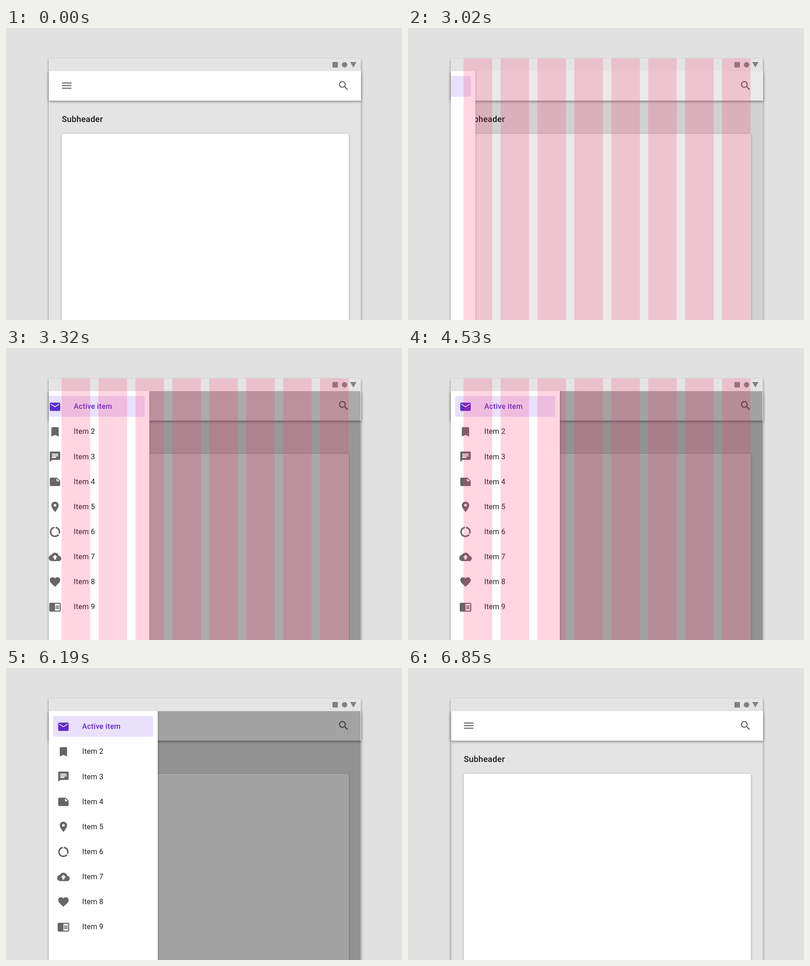
Recreate the animation shown at these times as an HTML page with a canvas. Size 871x643 px, loop 6.88 s.

```html
<!DOCTYPE html>
<html lang="en">
<head>
<meta charset="utf-8">
<title>Navigation drawer on a column grid</title>
<style>
html, body { margin: 0; width: 100%; height: 100%; overflow: hidden; background: #e1e1e1; }
canvas { display: block; width: 871px; height: 643px; font-family: Roboto, sans-serif; }
</style>
</head>
<body>
<canvas id="stage" width="871" height="643"></canvas>
<script>
const W = 871, H = 643, LOOP = 6880;
const LEFT = 94, RIGHT = 780.5, TOP = 67, BAR = 95, BAR_END = 160;
const DRAWER = 240, ICON = 1.15;
const c = document.getElementById('stage').getContext('2d');

const paths = {
  menu: 'M3 18h18v-2H3v2zm0-5h18v-2H3v2zm0-7v2h18V6H3z',
  search: 'M15.5 14h-.79l-.28-.27C15.41 12.59 16 11.11 16 9.5 16 5.91 13.09 3 9.5 3S3 5.91 3 9.5 5.91 16 9.5 16c1.61 0 3.09-.59 4.23-1.57l.27.28v.79l5 4.99L20.49 19l-4.99-5zm-6 0C7.01 14 5 11.99 5 9.5S7.01 5 9.5 5 14 7.01 14 9.5 11.99 14 9.5 14z',
  mail: 'M20 4H4c-1.1 0-2 .9-2 2v12c0 1.1.9 2 2 2h16c1.1 0 2-.9 2-2V6c0-1.1-.9-2-2-2zm0 4l-8 5-8-5V6l8 5 8-5v2z',
  bookmark: 'M17 3H7c-1.1 0-2 .9-2 2v16l7-3 7 3V5c0-1.1-.9-2-2-2z',
  chat: 'M20 2H4c-1.1 0-2 .9-2 2v18l4-4h14c1.1 0 2-.9 2-2V4c0-1.1-.9-2-2-2zM6 9h12v2H6V9zm8 5H6v-2h8v2zm4-6H6V6h12v2z',
  note: 'M22 10l-6-6H4c-1.1 0-2 .9-2 2v12c0 1.1.9 2 2 2h16c1.1 0 2-.9 2-2v-8zm-7-4.5l5.5 5.5H15V5.5z',
  place: 'M12 2C8.13 2 5 5.13 5 9c0 5.25 7 13 7 13s7-7.75 7-13c0-3.87-3.13-7-7-7zm0 9.5a2.5 2.5 0 1 1 0-5 2.5 2.5 0 0 1 0 5z',
  usage: 'M13 2.05v3.03c3.39.49 6 3.39 6 6.92 0 .9-.18 1.75-.48 2.54l2.6 1.53c.56-1.24.88-2.62.88-4.07 0-5.18-3.95-9.45-9-9.95zM12 19c-3.87 0-7-3.13-7-7 0-3.53 2.61-6.43 6-6.92V2.05c-5.06.5-9 4.76-9 9.95 0 5.52 4.47 10 9.99 10 3.31 0 6.24-1.61 8.06-4.09l-2.6-1.53C16.17 17.98 14.21 19 12 19z',
  cloud: 'M19.35 10.04C18.67 6.59 15.64 4 12 4 9.11 4 6.6 5.64 5.35 8.04 2.34 8.36 0 10.91 0 14c0 3.31 2.69 6 6 6h13c2.76 0 5-2.24 5-5 0-2.64-2.05-4.78-4.65-4.96zM14 13v4h-4v-4H7l5-5 5 5h-3z',
  heart: 'M12 21.35l-1.45-1.32C5.4 15.36 2 12.28 2 8.5 2 5.42 4.42 3 7.5 3c1.74 0 3.41.81 4.5 2.09C13.09 3.81 14.76 3 16.5 3 19.58 3 22 5.42 22 8.5c0 3.78-3.4 6.86-8.55 11.54L12 21.35z',
  reader: 'M13 12h7v1.5h-7zm0-2.5h7V11h-7zm0 5h7V16h-7zM21 4H3c-1.1 0-2 .9-2 2v13c0 1.1.9 2 2 2h18c1.1 0 2-.9 2-2V6c0-1.1-.9-2-2-2zm0 15h-9V6h9v13z'
};
const shapes = {};
for (const name in paths) shapes[name] = new Path2D(paths[name]);
const rows = ['mail', 'bookmark', 'chat', 'note', 'place', 'usage', 'cloud', 'heart', 'reader'];

function bezier(x1, x2) {
  const at = (s, a, b) => 3 * (1 - s) * (1 - s) * s * a + 3 * (1 - s) * s * s * b + s * s * s;
  return x => {
    if (x <= 0) return 0;
    if (x >= 1) return 1;
    let lo = 0, hi = 1;
    for (let i = 0; i < 30; i++) {
      const mid = (lo + hi) / 2;
      if (at(mid, x1, x2) < x) lo = mid; else hi = mid;
    }
    return at(lo, 0, 1);
  };
}
const slide = bezier(0.48, 0.31);
const fade = bezier(0.33, 0.67);
const span = (t, start, length) => (t - start) / length;

function rect(x, y, w, h, color) {
  c.fillStyle = color;
  c.fillRect(x, y, w, h);
}

function round(x, y, w, h, r, color) {
  c.fillStyle = color;
  c.beginPath();
  c.roundRect(x, y, w, h, r);
  c.fill();
}

function shadow(alpha, blur, dy, draw) {
  c.save();
  c.shadowColor = `rgba(0,0,0,${alpha})`;
  c.shadowBlur = blur;
  c.shadowOffsetY = dy;
  draw();
  c.restore();
}

function clipped(x, y, w, h, draw) {
  c.save();
  c.beginPath();
  c.rect(x, y, w, h);
  c.clip();
  draw();
  c.restore();
}

function icon(name, x, y, color) {
  c.save();
  c.translate(x, y);
  c.scale(ICON, ICON);
  c.translate(-12, -12);
  c.fillStyle = color;
  c.fill(shapes[name], 'evenodd');
  c.restore();
}

function text(str, x, y, weight, size, spacing, color) {
  c.font = `${weight} ${size}px Roboto, sans-serif`;
  c.letterSpacing = spacing + 'px';
  c.fillStyle = color;
  c.fillText(str, x, y);
}

function drawPage() {
  rect(0, 0, W, H, '#e1e1e1');
  shadow(0.42, 5, 1.5, () => rect(LEFT, TOP, RIGHT - LEFT, H, '#e4e4e4'));
  text('Subheader', 122.8, 206.5, 500, 18.4, 0.2, '#1c1c1c');
  shadow(0.36, 4, 1, () => round(122.5, 233, 631.7, H, 4, '#fff'));
  clipped(0, BAR, W, H, () =>
    shadow(0.45, 6, 2, () => rect(LEFT, BAR, 687, BAR_END - BAR, '#fff')));
  icon('menu', 133.5, 126.8, '#666');
  icon('search', 742.7, 127, '#666');
}

function drawStatus() {
  const gray = '#808080';
  rect(718, 75, 12, 12, gray);
  c.beginPath();
  c.arc(744.6, 81, 6, 0, 2 * Math.PI);
  c.moveTo(757, 75);
  c.lineTo(771, 75);
  c.lineTo(764, 86.7);
  c.fill();
}

function drawDrawer(open) {
  rect(LEFT, BAR, 686, H, `rgba(0,0,0,${0.36 * open})`);
  clipped(LEFT, BAR, RIGHT - LEFT, H, () => {
    c.translate((open - 1) * DRAWER, 0);
    shadow(0.4, 4, 0, () => rect(LEFT, BAR - 10, DRAWER, H, '#fff'));
    round(103.5, 105.5, 220.5, 46, 4, '#e9e0fb');
    rows.forEach((name, i) => {
      const y = i * 55.1, active = i === 0;
      icon(name, 126.5, 129.4 + y, active ? '#5c2bd0' : '#666');
      if (active) text('Active item', 167.8, 134.3, 500, 16.1, 0.3, '#5f2bcb');
      else text('Item ' + (i + 1), 167.8, 134.3 + y, 400, 16.1, 0.2, '#1c1c1c');
    });
  });
}

function drawGrid(opacity) {
  for (let i = 0; i < 8; i++) {
    rect(122.3 + i * 81.2, TOP, 62.8, H, `rgba(255,45,108,${0.2 * opacity})`);
  }
}

function render(t) {
  const open = slide(span(t, 2800, 730)) - slide(span(t, 6175, 690));
  const grid = fade(span(t, 1165, 645)) - fade(span(t, 4515, 675));
  drawPage();
  if (open > 0) drawDrawer(open);
  drawStatus();
  if (grid > 0) drawGrid(grid);
}

const began = performance.now();
function tick() {
  render((performance.now() - began) % LOOP);
  requestAnimationFrame(tick);
}
tick();
</script>
</body>
</html>
```
